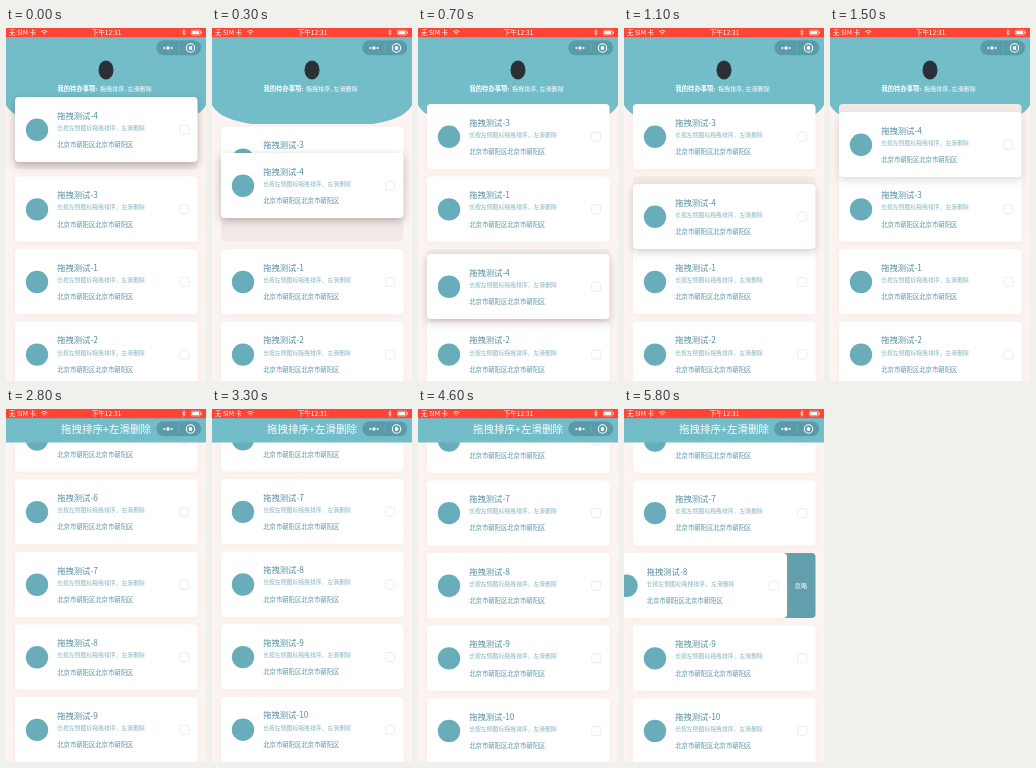
An HTML page that plays this animation: 200x353 px, repeating every 6 s.

```html
<!DOCTYPE html>
<html lang="zh">
<head>
<meta charset="utf-8">
<title>拖拽排序</title>
<style>
html, body { margin: 0; width: 100%; height: 100%; overflow: hidden; background: #fcf4f2; }
svg { display: block; width: 100%; height: 100%; font-family: "Noto Sans CJK SC", "Noto Sans CJK", "Noto Sans", sans-serif; }
.paper { fill: #fff; filter: drop-shadow(0 1px 3px rgba(240, 195, 190, .2)); }
.title { font-size: 8.3px; fill: #568f9e; font-weight: 500; }
.sub { font-size: 5.85px; fill: #84b3bd; }
.addr { font-size: 6.35px; fill: #5b95a3; }
.box { fill: #fff; stroke: #e3e9ea; stroke-width: .8; }
.icon { fill: #6aadba; }
.white { fill: #fff; }
</style>
</head>
<body>
<svg viewBox="0 0 200 353" preserveAspectRatio="none">
  <rect width="200" height="353" fill="#fcf4f2"/>
  <g id="page">
    <path d="M0 0H200V77C196 84 188 92 160 96H40C12 92 4 84 0 77Z" fill="#73bdc9"/>
    <ellipse cx="100" cy="42" rx="7.5" ry="9.5" fill="#2b3036"/>
    <text class="white" x="51.5" y="62.6" font-size="6.3" font-weight="700">我的待办事项:</text>
    <text class="white" x="94" y="62.6" font-size="6.1">拖拽排序, 左滑删除</text>
    <rect id="hole" x="9" width="182.5" height="65" rx="4" fill="#f3eae8"/>
    <g id="list"></g>
  </g>
  <g id="nav">
    <rect y="9" width="200" height="24.5" fill="#73bdc9"/>
    <text class="white" x="100" y="24.2" font-size="10.5" text-anchor="middle">拖拽排序+左滑删除</text>
  </g>
  <rect x="150" y="12" width="45.5" height="15.5" rx="7.75" fill="#599ca9" stroke="#80bfca" stroke-width=".5"/>
  <g class="white">
    <circle cx="158.4" cy="20" r="1"/><circle cx="162" cy="20" r="1.7"/><circle cx="165.6" cy="20" r="1"/>
    <circle cx="184.5" cy="20" r="1.9"/>
  </g>
  <circle cx="184.5" cy="20" r="4.2" fill="none" stroke="#fff" stroke-width="1.1"/>
  <path d="M173 15.5V24" stroke="#80b6c0" stroke-width=".5"/>
  <rect width="200" height="9.2" fill="#ff4434"/>
  <g class="white">
    <text x="3" y="6.7" font-size="6.5">无 SIM 卡</text>
    <text x="100.5" y="6.7" font-size="6.6" text-anchor="middle">下午12:31</text>
    <rect x="186.2" y="2.9" width="7" height="3.2"/>
    <rect x="195.2" y="3.6" width=".8" height="1.8"/>
  </g>
  <g fill="none" stroke="#fff" stroke-width=".8">
    <path d="M35.2 3.6Q38.3 1.2 41.4 3.6M36.5 5.1Q38.3 3.7 40.1 5.1M37.9 6.4H38.7"/>
    <path d="M176.3 3L179.3 6L177.8 7.4V1.6L179.3 3L176.3 6" stroke-width=".6"/>
    <rect x="185.4" y="2.1" width="9" height="4.8" rx=".8" stroke-width=".5"/>
  </g>
</svg>
<script>
const TOP = 76, PITCH = 72.6, LOOP = 6000, STEP = 100;
const byId = id => document.getElementById(id);

const clamp = v => Math.max(0, Math.min(1, v));
const ramp = (t, from, to) => clamp((t - from) / (to - from));
const smooth = (t, from, to) => {
  const p = ramp(t, from, to);
  return p * p * (3 - 2 * p);
};

// Motion of each part, as a function of time in ms.
const dragTop = t => 69 + 159 * smooth(t, 0, 750) - 144 * smooth(t, 750, 1450) - 8 * smooth(t, 1600, 2000);
const lift = t => 1 - .5 * ramp(t, 0, 1500) - .5 * ramp(t, 1600, 2000);
const fling = t => 441.5 * (1 - (1 - ramp(t, 2300, 3300)) ** 2.6) - 1.3 * ramp(t, 3900, 4000);
const swipe = t => -28.5 * smooth(t, 4500, 5000) - 3 * Math.sin(Math.PI * ramp(t, 5400, 5800));

const card = n => `<g id="c${n}">
  ${n === 8 ? `<g id="ignore"><rect x="150" width="41.5" height="65" rx="4" fill="#629fad"/>
    <text class="white" x="177" y="34.8" font-size="6.2" text-anchor="middle">忽略</text></g>` : ''}
  <g class="face">
    <rect class="paper" x="9" width="182.5" height="65" rx="4"/>
    <circle class="icon" cx="31" cy="32.8" r="11.2"/>
    <text class="title" x="51.2" y="21.6">拖拽测试-${n}</text>
    <text class="sub" x="51.2" y="32.8">长按左侧图标拖拽排序，左滑删除</text>
    <text class="addr" x="51.2" y="50">北京市朝阳区北京市朝阳区</text>
    <rect class="box" x="173.7" y="28.2" width="9" height="9" rx="2"/>
  </g></g>`;

// Card 4 comes last so that it floats above the others.
const rest = [3, 1, 2, 5, 6, 7, 8, 9, 10];
byId('list').innerHTML = [...rest, 4].map(card).join('');
const move = (el, x, y) => el.setAttribute('transform', `translate(${x} ${y})`);
const show = (id, on) => byId(id).setAttribute('opacity', on ? 1 : 0);
const held = byId('c4'), heldPaper = held.querySelector('.paper');
const swiped = byId('c8').querySelector('.face');

function draw(t) {
  const y = dragTop(t), up = lift(t), top = fling(t);
  const dx = t > 4600 ? swipe(t) : 0;
  const slot = (y - TOP) / PITCH;

  rest.forEach((n, i) => {
    const shift = clamp((slot - i - .4) / .4);
    move(byId('c' + n), 0, TOP + PITCH * (i + 1 - shift));
  });
  move(held, 0, y);
  heldPaper.style.filter = up > 0
    ? `drop-shadow(0 3px 4px rgba(95,75,75,${.42 * up}))` : '';
  byId('hole').setAttribute('y', TOP + PITCH * Math.round(slot));
  show('hole', up > 0);

  move(byId('page'), 0, -top);
  show('nav', top > 30);
  move(swiped, dx, 0);
  show('ignore', dx < 0);
}

const start = performance.now();
function tick() {
  const t = (performance.now() - start) % LOOP;
  draw(Math.floor(t / STEP) * STEP);
  requestAnimationFrame(tick);
}
tick();
</script>
</body>
</html>
```
